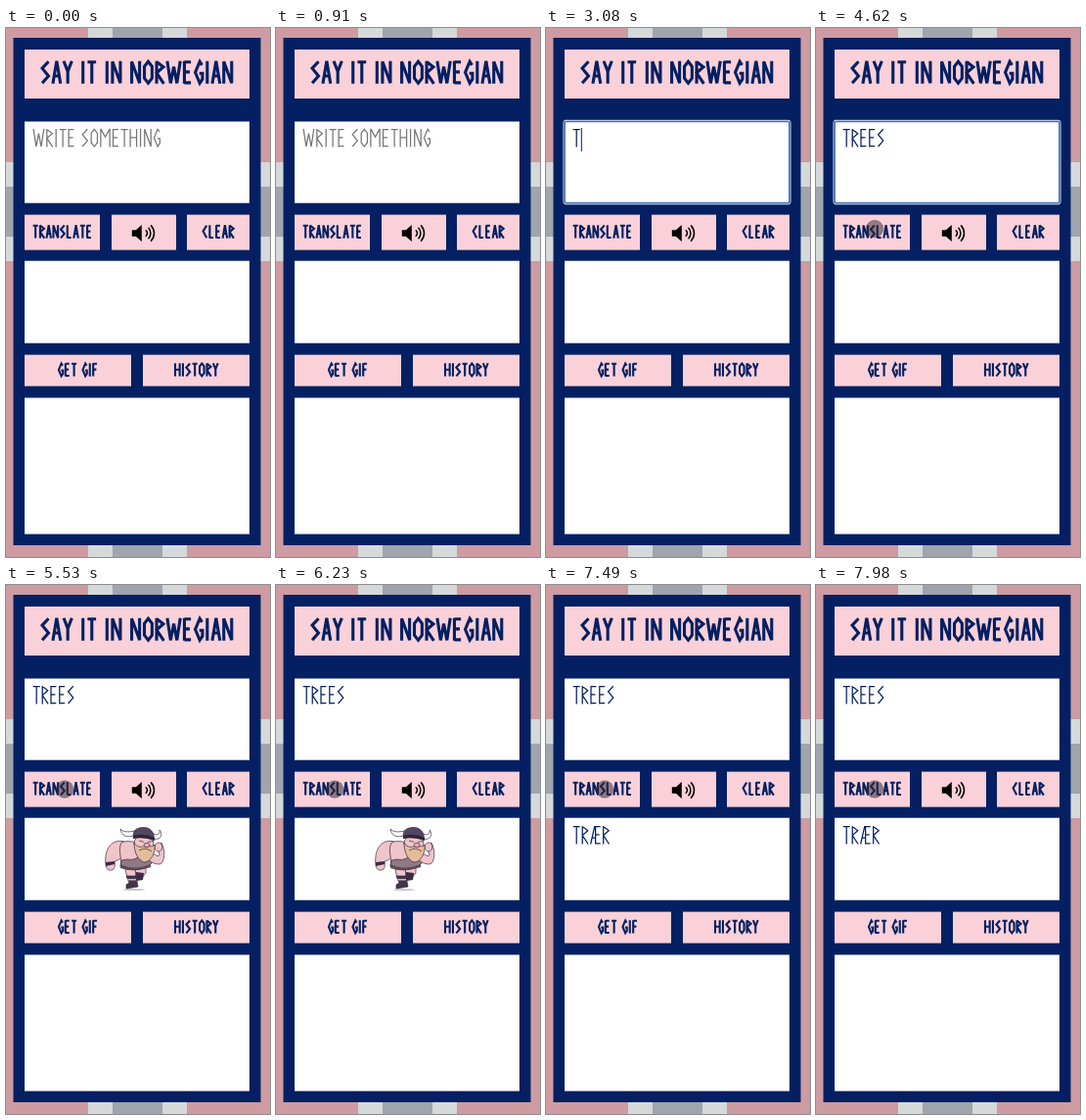
Recreate the animation shown at these times as an HTML page with a canvas. Size 270 by 540 pixels, loop 8 s.

```html
<!DOCTYPE html>
<html lang="en">
<head>
<meta charset="utf-8">
<title>Say it in Norwegian</title>
<style>
html, body { margin: 0; width: 100%; height: 100%; overflow: hidden; background: #cd9ba1; }
canvas { display: block; width: 270px; height: 540px; }
</style>
</head>
<body>
<canvas id="stage">
  <h1>Say it in Norwegian</h1>
  <p>Write something. Translate, Clear, Get GIF, History.</p>
</canvas>
<script>
const LOOP = 8000;
const W = 270, H = 540;
const NAVY = '#042062', PINK = '#fad1d8', INK = '#3b2b45', SKIN = '#f0c5ca';
const canvas = document.getElementById('stage');
const ctx = canvas.getContext('2d');
const dpr = window.devicePixelRatio || 1;
canvas.width = W * dpr;
canvas.height = H * dpr;

// Angular rune-like lettering, cap height 10.
const STEM = 'M.5 0V10';
const F = STEM + 'M.5 .4H3.4M.5 4.8H2.9';
const GLYPHS = {
  A: 'M.3 10L2 0 3.7 10M.9 6.6H3.1',
  C: 'M3.2 .3L.5 4.6 3.2 9.8',
  E: F + 'M.5 9.6H3.4',
  F,
  G: 'M3.4 1.8L2.4 .2 .4 5 2.4 9.8 3.6 8V5.4H2.2',
  H: STEM + 'M4 0V10M.5 4.9H4',
  I: 'M.8 0V10',
  L: STEM + 'M.5 9.6H3.3',
  M: 'M.5 10V0L3 4.5 5.5 0V10',
  N: 'M.5 10V.2L4 9.8V0',
  O: 'M2.3 .2L4 2.4V7.6L2.3 9.8 .6 7.6V2.4Z',
  R: STEM + 'M.5 .3L3.5 2.6 .5 5.2 3.7 10',
  S: 'M3.3 .2L.5 3.2 3.3 6.6 .5 9.8',
  T: 'M.1 .4H3.9M2 0V10',
  W: 'M.3 0L1.8 9.8 3.2 2.5 4.6 9.8 6.1 0',
  Y: 'M.2 0L2 4.6 3.8 0M2 4.6V10',
  Æ: 'M.3 10L2.5 .4H5.7M3 0V10M3 9.6H5.7M1 6.6H3M3 4.8H5.2'
};
const ADVANCE = { ' ': 2.5, I: 2.2, H: 5, N: 5, O: 5, M: 6.5, W: 6.9, Æ: 6.5 };
const PATHS = {};
for (const ch in GLYPHS) PATHS[ch] = new Path2D(GLYPHS[ch]);

const advance = (ch, track) => (ADVANCE[ch] || 4.4) + track;
const textWidth = (text, cap, track) =>
  [...text].reduce((sum, ch) => sum + advance(ch, track), -track) * cap / 10;

// Returns the x position after the last letter.
function write(text, x, y, cap, color, weight, track) {
  const k = cap / 10;
  ctx.strokeStyle = color;
  ctx.lineWidth = weight / k;
  ctx.lineJoin = 'miter';
  ctx.lineCap = 'butt';
  ctx.miterLimit = 3;
  for (const ch of text) {
    if (PATHS[ch]) {
      ctx.save();
      ctx.translate(x, y);
      ctx.scale(k, k);
      ctx.stroke(PATHS[ch]);
      ctx.restore();
    }
    x += advance(ch, track) * k;
  }
  return x;
}

const light = (text, y, color) => write(text, 27.5, y, 18.5, color, 1.25, 0.35);

function bold(text, cx, y, cap, weight, track) {
  write(text, cx - textWidth(text, cap, track) / 2, y, cap, NAVY, weight, track);
}

function box(x, y, r, b, color) {
  ctx.fillStyle = color;
  ctx.fillRect(x, y, r - x, b - y);
}

function button(label, x, y, r, b) {
  box(x, y, r, b, PINK);
  if (label) bold(label, (x + r) / 2 + 0.4, (y + b) / 2 - 7.4, 13.4, 2.1, 0.65);
}

function ellipse(x, y, rx, ry, fill, line) {
  ctx.beginPath();
  ctx.ellipse(x, y, rx, ry, 0, 0, 7);
  if (fill) { ctx.fillStyle = fill; ctx.fill(); }
  if (line) { ctx.strokeStyle = line; ctx.lineWidth = 0.7; ctx.stroke(); }
}

function shape(d, fill, line) {
  const path = new Path2D(d);
  if (fill) { ctx.fillStyle = fill; ctx.fill(path); }
  if (line) { ctx.strokeStyle = line; ctx.lineWidth = 0.7; ctx.stroke(path); }
}

function flag() {
  const white = '#d5d9da', blue = '#9fa4ad';
  box(0, 0, W, H, '#cd9ba1');
  box(84, 0, 185, H, white);
  box(0, 137, W, 238, white);
  box(109, 0, 160, H, blue);
  box(0, 162, W, 213, blue);
}

function speaker() {
  shape('M128.8 206.2h4l6-5.2v17l-6-5.2h-4z', '#000');
  ctx.strokeStyle = '#000';
  ctx.lineWidth = 1.5;
  ctx.lineCap = 'round';
  for (const r of [4, 7.6, 11.2]) {
    ctx.beginPath();
    ctx.arc(140.3, 209.5, r, -0.75, 0.75);
    ctx.stroke();
  }
}

function focusRing() {
  ctx.lineWidth = 1;
  ctx.strokeStyle = '#e6eefb';
  ctx.beginPath();
  ctx.roundRect(18, 94.3, 232, 85.5, 2);
  ctx.stroke();
  ctx.strokeStyle = '#2b62b8';
  ctx.strokeRect(19.3, 95.7, 229.4, 82.6);
}

function limb(x, y, turn, draw) {
  ctx.save();
  ctx.translate(x, y);
  ctx.rotate(turn);
  ctx.translate(-x, -y);
  draw();
  ctx.restore();
}

function viking(t) {
  const phase = (t - 5530) / 700 * Math.PI * 2;
  const swing = (1 - Math.cos(phase)) / 2;
  const bob = -1.5 * Math.sin(phase) ** 2;
  ellipse(131, 311, 11, 1, '#c9c5cc');
  ctx.save();
  ctx.translate(0, bob);
  limb(138, 288, swing * 0.45, () => {
    shape('M133 286L143 285 143 294 139 299 132 295z', SKIN, INK);
    shape('M133 293l8 1-1 7-6 1-3-4z', INK);
  });
  limb(127, 287, -swing * 0.4, () => {
    shape('M121 286L132 287 133 299 124 299z', SKIN, INK);
    shape('M123 297L133 297 135 308 123 310 123 306 126 304z', '#443447', INK);
    shape('M124 300h9v1.6h-8z', '#cdb9c4');
  });
  limb(118, 266, -swing * 0.35, () => {
    shape('M121 262C110 259 103 267 102 277C101 284 102 291 106 291C111 292 112 287 111 282C116 281 122 276 124 269z', SKIN, INK);
    shape('M102 283l9-1v3l-9 2z', INK);
  });
  shape('M118 263C125 259 143 264 147 271L147 285C140 292 125 292 117 287C119 279 114 271 118 263z', SKIN, INK);
  shape('M124 280C132 282 138 277 143 268L148 272 149 284C140 293 124 292 117 287L118 281z', '#8f7984', INK);
  shape('M117 285q14 7 31 0v3q-16 6-31 1z', '#5c4854');
  limb(148, 274, swing * 0.25, () => {
    shape('M148 273C153 275 156 279 157 275L154 268 159 263C163 270 163 284 157 285C151 285 147 282 146 280z', SKIN, INK);
    ellipse(156, 267.5, 3.8, 4.5, SKIN, INK);
  });
  ellipse(141, 264, 10, 9, SKIN, INK);
  shape('M131 263C135 269 138 267 143 267C147 266 150 268 152 265C153 274 148 283 141 283C136 281 131 275 131 263z', '#e2bd9c', INK);
  shape('M136 271q7-4 13 1', null, INK);
  ellipse(144, 265.5, 3, 2.2, '#edb0ab', INK);
  shape('M136 261l5 1.4M145 262.4l5-1', null, INK);
  shape('M132 255C124 259 118 256 117 249C120 253 127 252 132 251z', '#fff', INK);
  shape('M150 254C155 256 158 254 157 250C161 255 158 261 150 259z', '#fff', INK);
  shape('M130.5 258C129 250 134 247.5 141 247.5C147 247.5 152 252 151.5 260C145 257 137 256 130.5 258z', '#54465f', INK);
  shape('M130 256q11-3 22 2v3q-11-4-22-2z', '#2e2638');
  ctx.restore();
}

const ease = u => u * u * (3 - 2 * u);
const span = (t, a, b) => Math.min(1, Math.max(0, (t - a) / (b - a)));
const mix = (a, b, u) => a + (b - a) * u;

function arrow(t) {
  if (t < 1120 || t >= 2870) return;
  const u = ease(span(t, 1120, 1610));
  const x = mix(274, 45.5, u), y = mix(300, 110, u);
  ctx.save();
  ctx.translate(x, y);
  ctx.lineJoin = 'round';
  shape('M0 0V13.5L3.1 10.7 5.3 15.8 7.7 14.8 5.5 9.8H9.6z', '#000', '#fff');
  ctx.restore();
  if (t >= 1610 && t < 2030) {
    const out = span(t, 1680, 2030);
    ctx.globalAlpha = 1 - out;
    ctx.strokeStyle = '#000';
    ctx.lineWidth = 1.5;
    ctx.beginPath();
    ctx.arc(44, 111, 21 + 2 * out, 0, 7);
    ctx.stroke();
    ctx.globalAlpha = 1;
  }
}

function touch(t) {
  if (t < 4060) return;
  const u = ease(span(t, 4060, 4480));
  const x = mix(47, 60, u), y = mix(114, 205, u) + 3.5 * span(t, 4620, 4830);
  ellipse(x, y, 8.8, 8.8, 'rgba(50,42,52,.52)', 'rgba(40,35,45,.4)');
}

function caretOn(t) {
  if (t < 1610 || t >= 4900) return false;
  const from = t < 2870 ? 1660 : t < 3990 ? t : 3990;
  return Math.floor(Math.max(0, t - from) / 500) % 2 === 0;
}

function draw(t) {
  ctx.setTransform(dpr, 0, 0, dpr, 0, 0);
  flag();
  box(7.5, 10, 260.5, 528, NAVY);
  box(19, 22, 249, 72, PINK);
  bold('SAY IT IN NORWEGIAN', 134.5, 33.8, 23, 3.1, 0.53);
  box(19, 95.5, 249, 178.7, '#fff');
  box(19, 237.7, 249, 321.7, '#fff');
  box(19, 377.5, 249, 516.6, '#fff');
  button('TRANSLATE', 19, 190.6, 96, 226.6);
  button('', 108, 190.6, 174, 226.6);
  button('CLEAR', 185, 190.6, 249, 226.6);
  button('GET GIF', 19, 333.6, 128, 365.6);
  button('HISTORY', 140, 333.6, 249, 365.6);
  speaker();

  if (t >= 1610 && t < 4900) focusRing();
  const count = Math.min(5, Math.max(0, Math.floor((t - 2870) / 280) + 1));
  const typed = 'TREES'.slice(0, count);
  if (!count) light('WRITE SOMETHING', 102.9, '#757575');
  const end = light(typed, 102.9, NAVY);
  if (caretOn(t)) box(end - 0.5, 102, end + 0.5, 126, NAVY);

  if (t >= 7420) light('TRÆR', 246, NAVY);
  else if (t >= 4900) viking(t);
  arrow(t);
  touch(t);
}

const start = performance.now();
function tick() {
  draw((performance.now() - start) % LOOP);
  requestAnimationFrame(tick);
}
tick();
</script>
</body>
</html>
```
